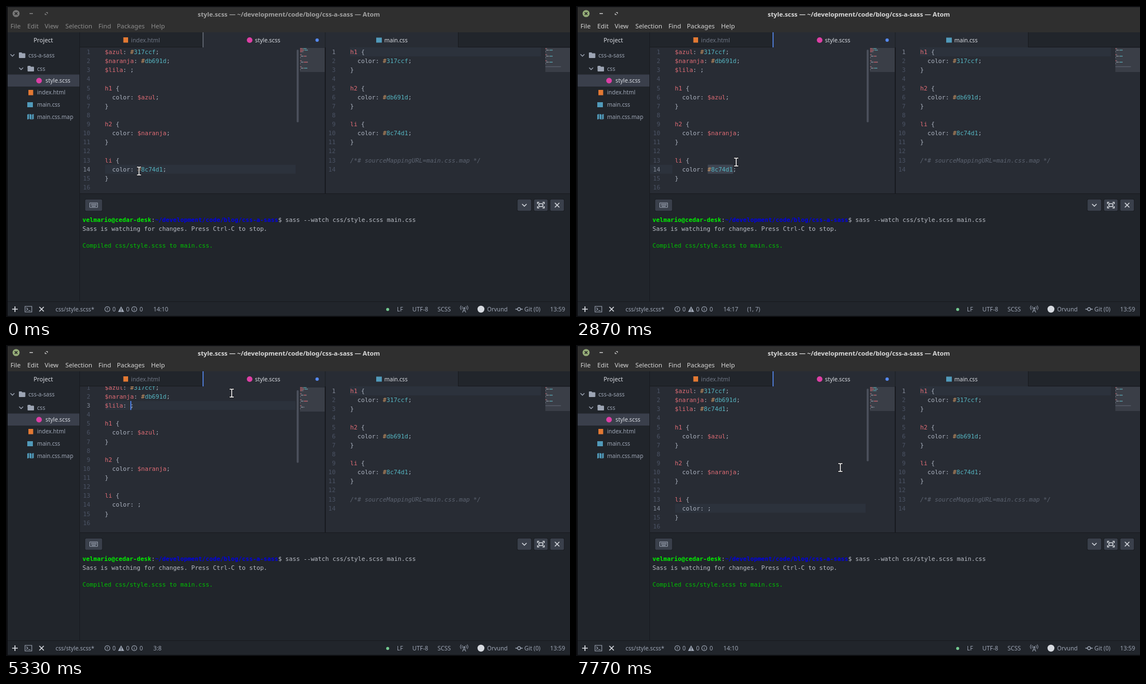
An HTML page with a canvas that plays this animation: 1007 by 556 pixels, repeating every 8000 ms.

```html
<!DOCTYPE html>
<html lang="es">
<head>
<meta charset="utf-8">
<title>Editor</title>
<style>
  html, body { margin: 0; width: 100%; height: 100%; overflow: hidden; background: #0d0e11; }
  canvas { display: block; }
</style>
</head>
<body>
<canvas id="stage" width="1007" height="556"></canvas>
<script>
const ctx = document.getElementById('stage').getContext('2d');
const LOOP = 8000;
const CHAR = 6.47, LINE = 16.13, TOP = 74, CODE_X = 177;
const MONO = '10.75px "DejaVu Sans Mono", monospace';
const ui = (size, weight = '') => `${weight} ${size}px "Noto Sans", sans-serif`;
const C = {
  chrome: '#2f2f2f', panel: '#21252b', editor: '#282c34', border: '#181a1f', row: '#3a3f4b',
  line: '#2c323c', selection: '#3e4451', label: '#9da5b4', bright: '#d7dae0', code: '#abb2bf',
  red: '#e06c75', orange: '#d19a66', cyan: '#56b6c2', comment: '#5c6370', number: '#4b5364',
  activeNumber: '#828997', blue: '#568af2', icon: '#519aba', html: '#e37933', pink: '#dd3fa5'
};

// Event times
const FOCUS = 1170, CUT = 3200, CLICK_TOP = 4600, PASTE = 5970, CLICK_LI = 7130;
const caretOff = [[1800, 2200], [2600, 3000], [3670, 4070], [4470, 4600], [4900, 5300],
                  [5700, 5970], [6470, 6870], [7770, 8000]];

// Pointer waypoints: time, x, y
const pointerPath = [
  [0, 237.5, 295], [370, 237.5, 295], [430, 237.5, 293], [1170, 237.5, 293], [1430, 274, 291],
  [1570, 282, 290.5], [1730, 282, 290.5], [1830, 282, 291], [2070, 282, 291], [2300, 306, 288],
  [2450, 305, 287], [2870, 286, 279], [3030, 286, 278], [3200, 286, 278], [3470, 279, 277],
  [3700, 270, 245], [4000, 240, 160], [4440, 223, 112], [4600, 223, 112], [4730, 406, 84],
  [4900, 406, 84], [5070, 404, 85], [5230, 404, 85], [5330, 403, 86], [6270, 403, 86],
  [6470, 425.5, 155.5], [6600, 500, 255], [6680, 534, 305], [6760, 480, 321], [6900, 330, 312],
  [7030, 229, 296], [7100, 235, 293], [7270, 237, 292], [7450, 380, 250], [7630, 472, 219],
  [8000, 472, 219]
];

function pointerAt(t) {
  const i = Math.max(1, pointerPath.findIndex(p => p[0] >= t));
  const [t0, x0, y0] = pointerPath[i - 1], [t1, x1, y1] = pointerPath[i];
  const k = Math.max(0, (t - t0) / (t1 - t0));
  return [x0 + (x1 - x0) * k, y0 + (y1 - y0) * k];
}

function rect(x, y, w, h, color) {
  ctx.fillStyle = color;
  ctx.fillRect(x, y, w, h);
}

function roundRect(x, y, w, h, r, color) {
  ctx.fillStyle = color;
  ctx.beginPath();
  ctx.roundRect(x, y, w, h, r);
  ctx.fill();
}

function dot(x, y, r, color) {
  ctx.fillStyle = color;
  ctx.beginPath();
  ctx.arc(x, y, r, 0, Math.PI * 2);
  ctx.fill();
}

function text(s, x, y, color = C.label, font = ui(10.3), align = 'left') {
  ctx.font = font;
  ctx.textAlign = align;
  ctx.fillStyle = color;
  ctx.fillText(s, x, y);
}

function stroke(x, y, path, color = C.label, width = 1.2) {
  ctx.save();
  ctx.translate(x, y);
  ctx.strokeStyle = color;
  ctx.lineWidth = width;
  ctx.stroke(new Path2D(path));
  ctx.restore();
}

const CROSS = 'M-4-4L4 4M4-4L-4 4';
const CHEVRON = 'M-3.5-1.7L0 1.8L3.5-1.7';

function tokens(line) {
  const rule = /(\/\*.*)|(\$\w+|^\w+)|(#(?=\w{6}))|(\w{6}(?=;))|\S/g;
  const colors = [C.comment, C.red, C.orange, C.cyan];
  return [...line.matchAll(rule)].map(m => {
    const kind = m.slice(1, 5).findIndex(Boolean);
    return { s: m[0], at: m.index, color: colors[kind] || C.code };
  });
}

function drawCode(lines, x, numberX, active, scroll) {
  lines.forEach((line, i) => {
    const y = TOP + 12 + LINE * i - scroll;
    text(i + 1, numberX, y, i + 1 === active ? C.activeNumber : C.number, MONO, 'right');
    for (const { s, at, color } of tokens(line)) {
      text(s, x + at * CHAR, y, color, (color === C.comment ? 'italic ' : '') + MONO);
    }
  });
}

function drawMinimap(lines, x, shift) {
  rect(x, 75 + shift, 44, 43, '#3a3e47');
  ctx.globalAlpha = 0.8;
  lines.forEach((line, i) => {
    for (const { s, at, color } of tokens(line)) {
      rect(x + at * 0.77, 75.5 + i * 2.69, s.length * 0.77, 1.4, color);
    }
  });
  ctx.globalAlpha = 1;
}

const rule = (name, value) => [`${name} {`, `  color: ${value};`, '}', ''];

function stylesheet(t) {
  return ['$azul: #317ccf;', '$naranja: #db691d;', `$lila: ${t < PASTE ? '' : '#8c74d1'};`, '',
    ...rule('h1', '$azul'), ...rule('h2', '$naranja'), ...rule('li', t < CUT ? '#8c74d1' : '')];
}

const compiled = [...rule('h1', '#317ccf'), ...rule('h2', '#db691d'), ...rule('li', '#8c74d1'),
  '/*# sourceMappingURL=main.css.map */', ''];

function caretState(t) {
  if (t >= FOCUS && t < CUT) {
    const column = Math.round((pointerAt(Math.max(FOCUS, t - 45))[0] - CODE_X) / CHAR);
    const selected = Math.max(0, Math.min(7, column - 9));
    return { row: 14, col: 10 + selected, selected };
  }
  if (t >= CLICK_TOP && t < CLICK_LI) return { row: 3, col: t < PASTE ? 8 : 15, selected: 0 };
  return { row: 14, col: 10, selected: 0 };
}

function drawTitle(focused) {
  rect(3, 2, 1004, 45, C.chrome);
  dot(18, 13.5, 6.3, focused ? '#95ad78' : '#777');
  stroke(18, 13.5, 'M-2.4-2.4L2.4 2.4M2.4-2.4L-2.4 2.4', '#2b2b2b', 1.5);
  const tone = focused ? '#d4d4d4' : '#8c8c8c';
  stroke(45, 13.5, 'M-3 0H3', tone, 1.4);
  stroke(72, 13.5, 'M-.5-2H2V.5M-2-.5V2H.5', tone, 1.1);
  text('style.scss — ~/development/code/blog/css-a-sass — Atom', 505, 18.7,
    focused ? '#dadada' : '#a2a2a2', ui(11.37, 'bold'), 'center');
  const menu = { File: 8, Edit: 38, View: 69, Selection: 106, Find: 165, Packages: 198, Help: 259 };
  for (const name in menu) text(name, menu[name], 40.3, tone, ui(11.3));
}

function drawFolder(x, y, label) {
  stroke(x, y, CHEVRON, C.label, 1.3);
  roundRect(x + 11.5, y - 5, 5.5, 4, 1, C.label);
  roundRect(x + 11.5, y - 3.5, 11.5, 8.5, 1, C.label);
  text(label, x + 28.5, y + 3.5, C.label, ui(10.1));
}

function drawTree() {
  rect(3, 47, 128, 481, C.panel);
  rect(3, 122.5, 128, 21.5, C.row);
  text('Project', 66.5, 64.7, C.bright, ui(10.6), 'center');
  drawFolder(11.5, 88, 'css-a-sass');
  drawFolder(27, 112, 'css');
  dot(59, 133.5, 5, C.pink);
  text('style.scss', 70.5, 137, C.bright, ui(10.2));
  rect(40, 150, 8.5, 9.5, C.html);
  text('index.html', 55.5, 158.3, C.label, ui(10.1));
  rect(38, 172, 10, 9, C.icon);
  text('main.css', 55.5, 180, C.label, ui(10.1));
  ctx.fillStyle = C.icon;
  ctx.fill(new Path2D('M38 194L41 193V202L38 203ZM42 193L45.5 194V203L42 202ZM46.5 194L49.5 193V202L46.5 203Z'));
  text('main.css.map', 55.5, 201.7, C.label, ui(10));
}

function drawTabs(focused) {
  rect(132, 47, 875, 27, C.panel);
  rect(132, 73, 219, 1, C.border);
  rect(807, 73, 200, 1, C.border);
  rect(351, 47, 218, 27, C.editor);
  rect(571, 47, 236, 27, C.editor);
  rect(807, 47, 1, 27, C.border);
  rect(351, 47, 1.6, 27, focused ? C.blue : '#666c77');
  rect(209.5, 56, 8.5, 9.5, C.html);
  text('index.html', 223.3, 64.7, '#6f7684', ui(10.3));
  dot(435, 61, 5, C.pink);
  text('style.scss', 444.5, 64.7, C.bright, ui(10.4));
  dot(555.5, 61, 3, C.blue);
  rect(661, 56.5, 10, 9, C.icon);
  text('main.css', 675.5, 64.7, C.bright, ui(10.2));
}

function drawEditors(t, caret, focused) {
  rect(132, TOP, 437, 261, C.editor);
  rect(571, TOP, 436, 261, C.editor);
  rect(569, 47, 2, 288, C.border);
  drawTabs(focused);

  const scroll = t >= CUT && t < PASTE ? 6.2 : 0;
  const lines = stylesheet(t);
  const lineTop = TOP + LINE * (caret.row - 1) - scroll;
  const caretX = CODE_X + (caret.col - 1) * CHAR;
  ctx.save();
  ctx.beginPath();
  ctx.rect(132, TOP, 875, 261);
  ctx.clip();
  if (caret.selected) {
    rect(132, lineTop, 40, LINE, C.line);
    rect(caretX - caret.selected * CHAR, lineTop, caret.selected * CHAR, LINE, C.selection);
  } else {
    rect(CODE_X, lineTop, 340, LINE, C.line);
  }
  drawCode(lines, CODE_X - 0.5, 150.5, caret.row, scroll);
  if (focused && !caretOff.some(([from, to]) => t >= from && t < to)) {
    rect(caretX - 0.3, lineTop, 1.6, LINE, '#528bff');
  }
  rect(614, TOP, 341, LINE, C.line);
  drawCode(compiled, 614.5, 588.5, 1, 0);
  ctx.restore();

  roundRect(519, 78 + scroll * 0.45, 3.6, 130, 1.8, '#4b505b');
  drawMinimap(lines, 525, scroll / 6.2);
  drawMinimap(compiled, 963, 0);
}

function drawTerminal() {
  rect(132, 335, 875, 1, C.border);
  rect(132, 336, 875, 192, C.panel);
  for (const [x, w] of [[140.5, 32], [912.5, 26], [942, 26], [971, 26]]) {
    roundRect(x, 345, w, 22, 2.5, C.border);
    roundRect(x + 0.8, 345.8, w - 1.6, 20.4, 2, '#3a404b');
  }
  stroke(156.5, 356, 'M-7-4H7V4H-7Z', C.label, 1);
  stroke(156.5, 356, 'M-5-1.8H5.5M-5 .2H5.5M-3.5 2.3H3.5', C.label, 1);
  stroke(925.5, 356, 'M-4-2L0 2L4-2', C.bright, 1.5);
  stroke(955, 356, 'M-6-2V-5H-3M3-5H6V-2M6 2V5H3M-3 5H-6V2M-3.5-2.5H3.5V2.5H-3.5Z', C.bright, 1.5);
  stroke(984, 356, CROSS, C.bright, 1.5);

  const prompt = [
    ['velmario@cedar-desk', '#00f000', 'bold '], [':', C.code, ''],
    ['~/development/code/blog/css-a-sass', '#0000e6', 'bold '],
    ['$ sass --watch css/style.scss main.css', '#b8bcc4', '']
  ];
  let x = 136.5;
  for (const [s, color, weight] of prompt) {
    text(s, x, 386.3, color, weight + MONO);
    x += s.length * CHAR;
  }
  text('Sass is watching for changes. Press Ctrl-C to stop.', 136.5, 401.6, '#b8bcc4', MONO);
  text('Compiled css/style.scss to main.css.', 136.5, 432.2, '#00c000', MONO);
}

function drawStatus(caret) {
  rect(3, 528, 1004, 1, C.border);
  rect(3, 529, 1004, 25, C.panel);
  const y = 542, base = 546;
  stroke(16, y, 'M-5 0H5M0-5V5', C.bright, 1.7);
  stroke(40, y, 'M-6-5H6V5H-6ZM-3.5-2.5L-1 0L-3.5 2.5M0 2.5H3.5', C.label, 1.1);
  stroke(63.5, y, CROSS, C.bright, 1.6);
  text('css/style.scss*', 88.5, base);
  const ring = 'M4.5 0A4.5 4.5 0 1 1-4.5 0A4.5 4.5 0 1 1 4.5 0';
  stroke(181, y, ring + 'M0-2.6V.6M0 1.4V2.6', C.label, 1.1);
  ctx.fillStyle = C.label;
  ctx.fill(new Path2D('M205.5 537L211 547H200Z'));
  stroke(205.5, y, 'M0-1.5V2M0 2.8V4', C.panel, 1.1);
  stroke(229, y, ring + 'M0-2.6V-1.4M0-.6V2.6', C.label, 1.1);
  for (const x of [190, 214.5, 238.5]) text('0', x, base);
  text(`${caret.row}:${caret.col}`, 263, base, C.label, ui(10.5));
  if (caret.selected) text(`(1, ${caret.selected})`, 305.5, base);

  dot(681.5, 542.5, 2.7, '#73c990');
  text('LF', 698, base);
  text('UTF-8', 725.5, base, C.label, ui(10.5));
  text('SCSS', 770.5, base, C.label, ui(10.4));
  stroke(818, y, 'M0-2L-3 6M0-2L3 6M-2 3H2M-3-5Q-5-2.5-3 0M3-5Q5-2.5 3 0M-5.5-6.5Q-8.5-2.5-5.5 1.5M5.5-6.5Q8.5-2.5 5.5 1.5', C.label, 1);
  dot(818, 540, 1.4, C.label);
  dot(848, y, 6.2, C.bright);
  text('Orvund', 859, base);
  stroke(916, y, 'M-6.5 0H-2.8M2.8 0H6.5M2.8 0A2.8 2.8 0 1 1-2.8 0A2.8 2.8 0 1 1 2.8 0', C.label, 1.4);
  text('Git (0)', 925.5, base);
  text('13:59', 971.5, base, C.label, ui(10.5));
}

function drawPointer(x, y) {
  const beam = 'M-3-7H-1.3Q0-7 0-5.7Q0-7 1.3-7H3M0-5.7V5.7M-3 7H-1.3Q0 7 0 5.7Q0 7 1.3 7H3';
  ctx.lineCap = 'square';
  stroke(x, y, beam, '#101114', 3);
  stroke(x, y, beam, '#fff', 1.5);
  ctx.lineCap = 'butt';
}

function draw(t) {
  const focused = t >= FOCUS;
  const caret = caretState(t);
  rect(0, 0, 1007, 556, '#0d0e11');
  drawTitle(focused);
  drawTree();
  rect(131, 47, 1, 481, C.border);
  drawEditors(t, caret, focused);
  drawTerminal();
  drawStatus(caret);
  drawPointer(...pointerAt(t));
}

function tick() {
  draw(performance.now() % LOOP);
  requestAnimationFrame(tick);
}
tick();
</script>
</body>
</html>
```
